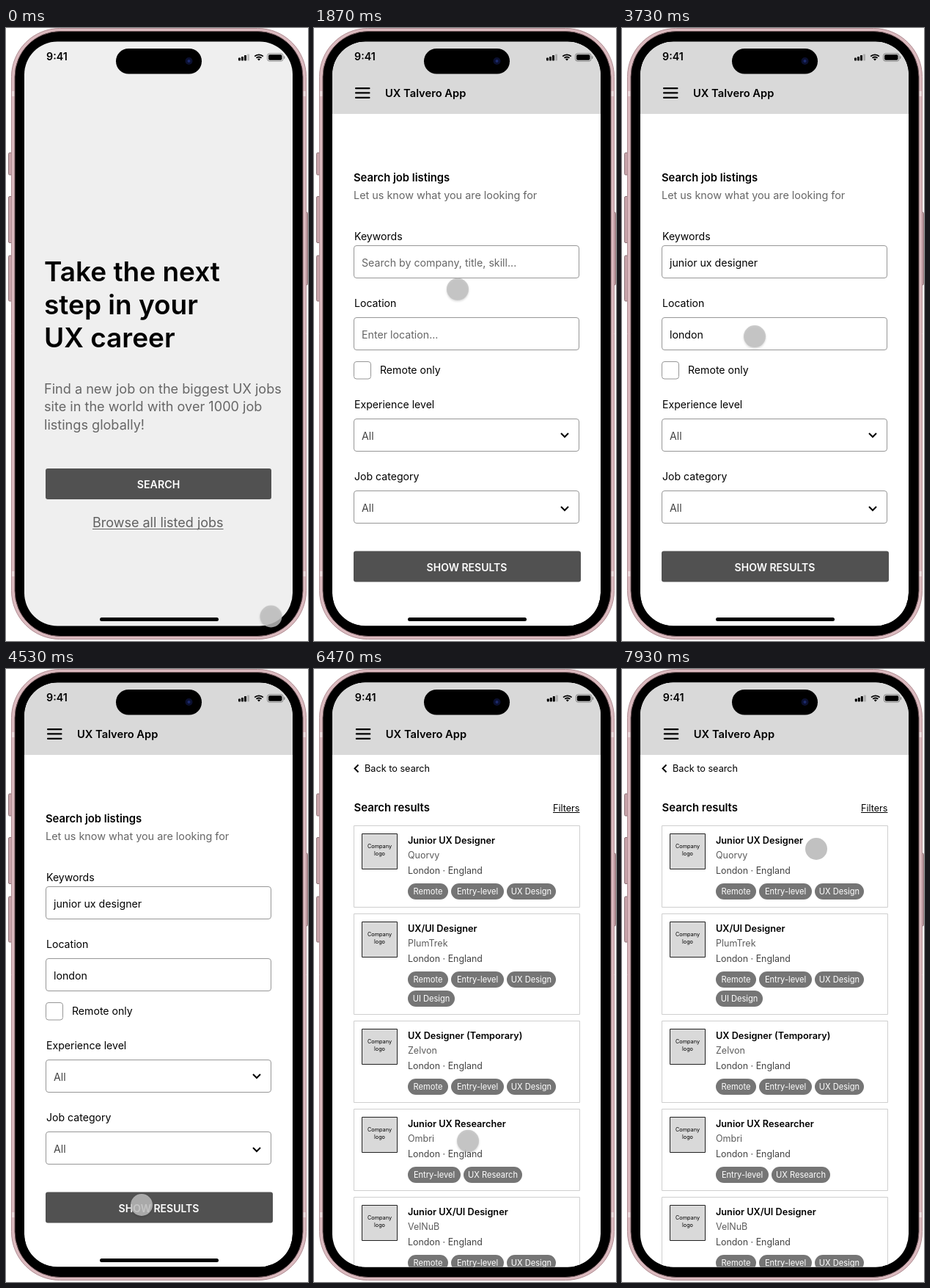
An HTML page with a canvas for the animation above (8000 ms loop, 412x835 px).

```html
<!DOCTYPE html>
<html lang="en">
<head>
<meta charset="utf-8">
<title>Job search prototype</title>
<style>
html, body { margin: 0; width: 100%; height: 100%; overflow: hidden; background: #fff; }
canvas { display: block; width: 412px; height: 835px; }
</style>
</head>
<body>
<canvas id="stage"></canvas>
<script>
const W = 412, H = 835, LOOP = 8000;
const canvas = document.getElementById('stage');
const ctx = canvas.getContext('2d');
const dpr = window.devicePixelRatio || 1;
canvas.width = W * dpr;
canvas.height = H * dpr;

const SCREEN = { x: 25, y: 18.5, w: 366, h: 796, r: 45 };
const SLIDE = { start: 843, time: 765, dist: 367 };
const KEYWORD_AT = 2200, LOCATION_AT = 3530, RESULTS_AT = 5000;
const PRESSES = [[670, 870], [2100, 2200], [3270, 3530], [4800, 5000], [7925, 8000]];

// Pointer path: time, x, y
const PATH = [
  [0, 361.5, 801.5], [40, 361.5, 801.5], [670, 206, 616], [1230, 206, 616],
  [1670, 200, 405], [1870, 196, 356], [2070, 191, 313], [2200, 191, 313],
  [2530, 178, 362], [2870, 176, 409.5], [3500, 176, 409.5], [3730, 181, 420],
  [4060, 202, 580], [4330, 185.5, 709], [4530, 185, 730], [5370, 185, 730],
  [5600, 193, 714], [5930, 203, 676], [6230, 203, 676], [6470, 210, 643],
  [7070, 252, 304], [7930, 265, 245], [8000, 265, 245]
];

function slope(i, k) {
  return (PATH[i + 1][k] - PATH[i][k]) / (PATH[i + 1][0] - PATH[i][0]);
}

// Monotone tangent: still at rests and turning points
function tangent(i, k) {
  if (i === 0 || i === PATH.length - 1) return 0;
  const a = slope(i - 1, k), b = slope(i, k);
  return a * b <= 0 ? 0 : 2 * a * b / (a + b);
}

function pathAt(t, k) {
  let i = 0;
  while (i < PATH.length - 2 && t >= PATH[i + 1][0]) i++;
  const a = PATH[i], b = PATH[i + 1], d = b[0] - a[0];
  const u = (t - a[0]) / d, u2 = u * u, u3 = u2 * u;
  return (2 * u3 - 3 * u2 + 1) * a[k] + (u3 - 2 * u2 + u) * d * tangent(i, k)
    + (3 * u2 - 2 * u3) * b[k] + (u3 - u2) * d * tangent(i + 1, k);
}

function text(s, x, y, size, color = '#000', weight = 400, align = 'left') {
  ctx.font = `${weight} ${size}px Inter, "Open Sans", sans-serif`;
  ctx.textAlign = align;
  ctx.fillStyle = color;
  ctx.fillText(s, x, y);
}

function box(x, y, w, h, r, fill, stroke, line = 1) {
  ctx.beginPath();
  ctx.roundRect(x, y, w, h, r);
  if (fill) { ctx.fillStyle = fill; ctx.fill(); }
  if (stroke) { ctx.strokeStyle = stroke; ctx.lineWidth = line; ctx.stroke(); }
}

function polyline(points, width) {
  ctx.beginPath();
  points.forEach(([x, y]) => ctx.lineTo(x, y));
  ctx.strokeStyle = '#000';
  ctx.lineWidth = width;
  ctx.stroke();
}

function underlined(s, x, y, size, color, gap) {
  text(s, x, y, size, color);
  ctx.fillRect(x, y + gap, ctx.measureText(s).width, 1);
}

function statusBar() {
  text('9:41', 55, 44, 14.3, '#000', 600);
  [4, 5.5, 7.5, 9].forEach((h, i) =>
    box(317 + i * 4, 44.5 - h, 3, h, 0.8, i < 3 ? '#000' : 'rgba(0,0,0,.2)'));
  ctx.strokeStyle = ctx.fillStyle = '#000';
  ctx.lineWidth = 1.8;
  for (const r of [8.2, 5]) {
    ctx.beginPath();
    ctx.arc(345, 44.5, r, -Math.PI * 0.75, -Math.PI * 0.25);
    ctx.stroke();
  }
  ctx.beginPath();
  ctx.moveTo(345, 44.5);
  ctx.arc(345, 44.5, 2.8, -Math.PI * 0.75, -Math.PI * 0.25);
  ctx.fill();
  box(356.5, 34.8, 21.5, 10.4, 3, null, 'rgba(0,0,0,.4)');
  box(358, 36.3, 18.5, 7.4, 1.8, '#000');
  box(379, 38.3, 1.3, 3.6, 0.6, 'rgba(0,0,0,.4)');
}

function homeBar() {
  box(128, 803, 162, 5, 2.5, '#000');
}

function header() {
  statusBar();
  for (const y of [82, 88.4, 94.8]) box(56, y - 1.1, 20.5, 2.3, 1, '#000');
  text('UX Talvero App', 97, 94, 14.7, '#000', 600);
}

function fillScreen(color) {
  ctx.fillStyle = color;
  ctx.fillRect(SCREEN.x - 1, SCREEN.y - 1, SCREEN.w + 2, SCREEN.h + 2);
}

function headerBand() {
  ctx.fillStyle = '#d9d9d9';
  ctx.fillRect(SCREEN.x - 1, SCREEN.y - 1, SCREEN.w + 2, 117 - SCREEN.y + 1);
}

function welcome() {
  fillScreen('#efefef');
  statusBar();
  ['Take the next', 'step in your', 'UX career'].forEach((s, i) =>
    text(s, 52, 345 + i * 45, 37, '#000', 600));
  ['Find a new job on the biggest UX jobs', 'site in the world with over 1000 job', 'listings globally!']
    .forEach((s, i) => text(s, 52, 498 + i * 24.4, 18.1, '#666'));
  box(54, 600, 308, 42, 3, '#515151');
  text('SEARCH', 208, 627, 14.2, '#fff', 600, 'center');
  underlined('Browse all listed jobs', 118, 680, 18, '#606060', 2);
  homeBar();
}

function field(label, labelY, y, value, color) {
  text(label, 55, labelY, 14.1);
  box(54.5, y + 0.5, 307, 44, 3.5, '#fff', '#979797');
  text(value, 65, y + 28.7, 14.2, color);
}

function chevron(y) {
  polyline([[337, y - 2.5], [342, y + 2.5], [347, y - 2.5]], 2);
}

function form(t) {
  fillScreen('#fff');
  headerBand();
  header();
  text('Search job listings', 54, 209, 14.8, '#000', 600);
  text('Let us know what you are looking for', 54, 232.5, 14.4, '#666');
  const hasKey = t >= KEYWORD_AT, hasPlace = t >= LOCATION_AT;
  field('Keywords', 288.5, 296, hasKey ? 'junior ux designer' : 'Search by company, title, skill...', hasKey ? '#000' : '#666');
  field('Location', 380, 394, hasPlace ? 'london' : 'Enter location...', hasPlace ? '#000' : '#666');
  box(54.5, 454.5, 23, 23.5, 3.5, '#fff', '#979797');
  text('Remote only', 90, 470.5, 14.1);
  field('Experience level', 518, 532, 'All', '#444');
  field('Job category', 616, 630, 'All', '#444');
  chevron(554.5);
  chevron(654.5);
  box(54, 712.5, 310, 42, 3, '#515151');
  text('SHOW RESULTS', 208.5, 739.5, 14, '#fff', 600, 'center');
  homeBar();
}

const TAG_W = { 'Remote': 55, 'Entry-level': 72, 'UX Design': 67, 'UI Design': 64, 'UX Research': 80 };
const BASIC = ['Remote', 'Entry-level', 'UX Design'];
const JOBS = [
  ['Junior UX Designer', 'Quorvy', BASIC],
  ['UX/UI Designer', 'PlumTrek', [...BASIC, 'UI Design']],
  ['UX Designer (Temporary)', 'Zelvon', BASIC],
  ['Junior UX Researcher', 'Ombri', ['Entry-level', 'UX Research']],
  ['Junior UX/UI Designer', 'VelNuB', BASIC]
];

function card(y, [title, company, tags]) {
  const h = tags.length > 3 ? 138 : 112;
  box(54.5, y + 0.5, 308, h - 1, 0, '#fff', '#cfcfcf');
  box(65.5, y + 11.5, 48, 48, 0, '#d9d9d9', '#222');
  text('Company', 89.5, y + 31, 7.3, '#000', 400, 'center');
  text('logo', 89.5, y + 40.5, 7.3, '#000', 400, 'center');
  text(title, 128, y + 24.7, 12.7, '#000', 600);
  text(company, 128, y + 45.3, 12.5, '#5c5c5c');
  text('London · England', 128, y + 66, 12.4, '#444');
  let x = 128;
  tags.forEach((tag, i) => {
    if (i === 3) x = 128;
    const top = y + 79 + (i === 3 ? 26 : 0), w = TAG_W[tag];
    box(x, top, w, 22, 11, '#757575');
    text(tag, x + w / 2, top + 15, 11.1, '#fff', 400, 'center');
    x += w + 4;
  });
  return y + h + 8;
}

function results() {
  fillScreen('#fff');
  headerBand();
  ctx.save();
  ctx.translate(0.8, 0);
  header();
  ctx.restore();
  polyline([[60.5, 130.5], [55.5, 135.5], [60.5, 140.5]], 1.9);
  text('Back to search', 69, 140.3, 12.7);
  text('Search results', 54.5, 193.7, 14.9, '#000', 600);
  underlined('Filters', 326, 193.5, 12.6, '#000', 1.5);
  JOBS.reduce(card, 213);
}

function body() {
  const sideKey = (x, y, w, h) => box(x, y, w, h, 1.5, '#c9a4aa', '#8d7377');
  sideKey(3.5, 170, 6, 30);
  sideKey(3.5, 229.5, 6, 63);
  sideKey(3.5, 310, 6, 62);
  sideKey(406, 251, 5.5, 99);
  box(7.5, 0.5, 402, 832, 66, '#dab9be', '#b08d93');
  ctx.fillStyle = '#eadadc';
  for (const y of [86, 740]) {
    ctx.fillRect(8, y, 5, 7);
    ctx.fillRect(404, y, 5, 7);
  }
  box(12, 4.5, 393, 824, 62, '#000', '#6f565a');
}

function disc(x, y, r, color) {
  ctx.fillStyle = color;
  ctx.beginPath();
  ctx.arc(x, y, r, 0, 2 * Math.PI);
  ctx.fill();
}

function island() {
  box(150, 28, 117, 34.5, 17.2, '#000');
  disc(249.5, 45, 5, '#0b1030');
  disc(249.5, 45, 2, '#1c2a6b');
}

function pointer(t) {
  const pressed = PRESSES.some(([a, b]) => t >= a && t < b);
  ctx.save();
  if (!pressed) {
    ctx.shadowColor = 'rgba(0,0,0,.2)';
    ctx.shadowBlur = 3 * dpr;
    ctx.shadowOffsetY = 1.5 * dpr;
  }
  disc(pathAt(t, 1), pathAt(t, 2), 15, pressed ? 'rgba(178,178,178,.8)' : 'rgba(192,192,192,.82)');
  ctx.restore();
}

function outline() {
  ctx.beginPath();
  ctx.roundRect(SCREEN.x, SCREEN.y, SCREEN.w, SCREEN.h, SCREEN.r);
}

function screens(t) {
  if (t >= RESULTS_AT) return results();
  const p = Math.min(1, Math.max(0, (t - SLIDE.start) / SLIDE.time));
  if (p < 1) welcome();
  if (p === 0) return;
  ctx.save();
  ctx.translate(SLIDE.dist * (1 - p) ** 2, 0);
  ctx.save();
  outline();
  ctx.clip();
  form(t);
  ctx.restore();
  if (p < 1) {
    outline();
    ctx.strokeStyle = '#333';
    ctx.lineWidth = 1;
    ctx.stroke();
  }
  ctx.restore();
}

function draw(t) {
  ctx.setTransform(dpr, 0, 0, dpr, 0, 0);
  ctx.fillStyle = '#fff';
  ctx.fillRect(0, 0, W, H);
  body();
  ctx.save();
  outline();
  ctx.clip();
  screens(t);
  ctx.restore();
  island();
  pointer(t);
}

const begin = performance.now();
function tick() {
  draw((performance.now() - begin) % LOOP);
  requestAnimationFrame(tick);
}
tick();
</script>
</body>
</html>
```
